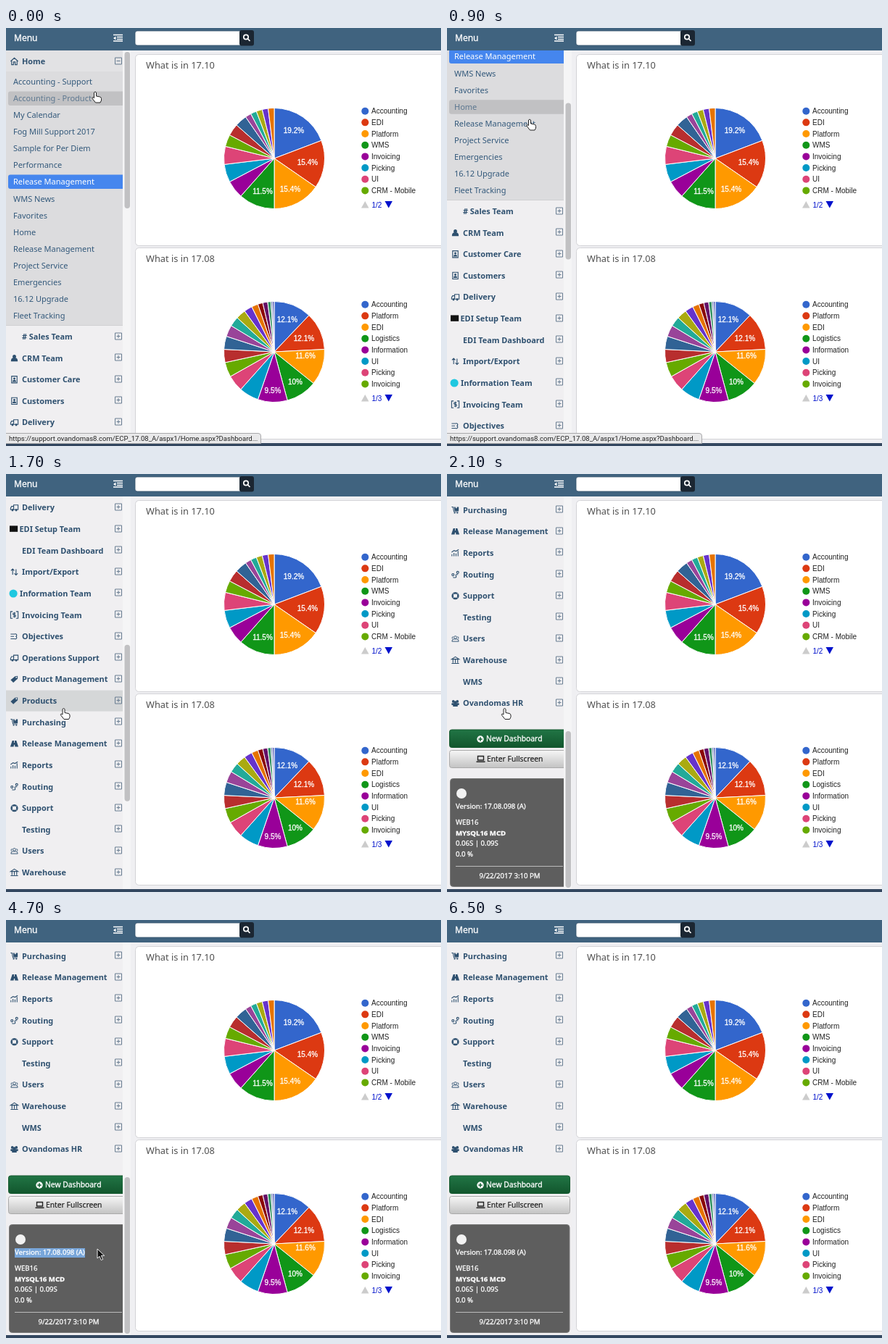
These frames come from a looping animation (600 by 577 pixels, 6.6 s). An HTML page:

```html
<!DOCTYPE html>
<html lang="en">
<head>
<meta charset="utf-8">
<title>Dashboard menu</title>
<style>
  html, body { margin: 0; width: 100%; height: 100%; overflow: hidden; background: #efeff2; }
  svg { display: block; width: 600px; height: 577px; }
  text { font-family: "Noto Sans", "Open Sans", sans-serif; white-space: pre; }
  .chart { font-family: "Liberation Sans", Arial, sans-serif; font-size: 10px; fill: #222; }
  .sub { font-size: 11px; fill: #33597b; }
  .group { font-size: 10.9px; font-weight: 700; fill: #2e506f; }
  .button { font-size: 10.3px; }
  .info { font-size: 9.6px; }
  .light { fill: #fff; stroke: #fff; stroke-width: .3; }
  .status { font: 9.55px Roboto, sans-serif; fill: #222; }
  .line { fill: none; stroke: #2e506f; stroke-width: 1.2; }
  .solid { fill: #2e506f; }
</style>
</head>
<body>
<svg viewBox="0 0 600 577">
  <defs>
    <linearGradient id="green" x2="0" y2="1"><stop stop-color="#217545"/><stop offset="1" stop-color="#12562d"/></linearGradient>
    <linearGradient id="silver" x2="0" y2="1"><stop stop-color="#f6f6f6"/><stop offset="1" stop-color="#c3c3c3"/></linearGradient>
    <clipPath id="side"><rect id="sideBox" y="31" width="161" height="542"/></clipPath>
  </defs>
  <rect width="600" height="577" fill="#efeff2"/>
  <g id="main"></g>
  <rect y="30" width="172" height="543" fill="#f0eff1"/>
  <g clip-path="url(#side)"><g id="menu"></g></g>
  <g id="bar">
    <rect x="161" y="31" width="11" height="542" fill="#f5f5f6"/>
    <rect id="thumb" x="163.5" y="33" width="7.5" height="216" rx="3.7" fill="#c1c1c3"/>
  </g>
  <rect y="573" width="600" height="4" fill="#33475f"/>
  <g id="head"></g>
  <g id="status">
    <path d="M0 559.5H348q3.500 0 3.500 3.500V573.500H0" fill="#e9e9ea" stroke="#a9a9ab"/>
    <text x="4" y="570" class="status">https://support.ovandomas8.com/ECP_17.08_A/aspx1/Home.aspx?Dashboard...</text>
  </g>
  <path id="hand" d="M-1.500 1q1.500-2 3 0v5l5 1q2 .6 2 2.500v2.500l-1.500 3h-6.500l-4.700-6q0-2 2-1l.7.700z" fill="#fff" stroke="#222"/>
  <path id="arrow" d="M0 0v13l3-2.800 2.300 5.300 2.300-1-2.200-5.200h4.300z" fill="#111" stroke="#fff" stroke-width=".9"/>
</svg>
<script>
const $ = id => document.getElementById(id);
const text = (x, y, str, cls, extra = '') => `<text x="${x}" y="${y}" class="${cls}" ${extra}>${str}</text>`;
const rect = (x, y, w, h, fill, extra = '') => `<rect x="${x}" y="${y}" width="${w}" height="${h}" fill="${fill}" ${extra}/>`;
const path = (d, cls, extra = '') => `<path d="${d}" class="${cls}" ${extra}/>`;

// Charts
const colors = ('#36c #dc3912 #ff9900 #109618 #909 #0099c6 #dd4477 #66aa00 #b82e2e #316395 ' +
  '#949 #2a9 #aa1 #63c #e67300 #8b0707 #651067 #329262 #5574a6 #3b3eac').split(' ');

function pie(cx, cy, parts) {
  const total = parts.reduce((a, b) => a + b), r = 69.5;
  let sum = 0;
  const rim = () => {
    const a = sum / total * 2 * Math.PI;
    return `${cx + r * Math.sin(a)} ${cy - r * Math.cos(a)}`;
  };
  return parts.map((part, i) => {
    const from = rim();
    sum += part;
    return `<path d="M${cx} ${cy}L${from}A${r} ${r} 0 0 1 ${rim()}z" fill="${colors[i]}" stroke="#fff"/>`;
  }).join('');
}

function card(top, title, parts, labels, legend, page) {
  const first = top + 77.7, foot = top + 207;
  return rect(178.5, top - .5, 440, 264, '#fff', 'rx="5" stroke="#d3d3d7"') +
    text(193, top + 19, title, '', 'font-size="12.8" fill="#505050"') +
    pie(370, top + 143, parts) +
    labels.map(([s, x, y]) => text(x, y + 3.5, s, 'chart light', 'text-anchor="middle"')).join('') +
    legend.split(',').map((s, i) => {
      const y = first + i * 15.67;
      return `<circle cx="495.3" cy="${y}" r="5" fill="${colors[i]}"/>` + text(504, y + 3.6, s, 'chart');
    }).join('') +
    `<path d="M490 ${foot + 4.5}h10.500l-5.200-9.500z" fill="#ccc"/>` +
    text(504.5, foot + 3.6, page, 'chart', 'style="fill:#01c"') +
    `<path d="M522.500 ${foot - 5}h10.500l-5.200 9.500z" fill="#01c"/>`;
}

$('main').innerHTML =
  card(37, 'What is in 17.10', [10, 8, 8, 6, 3, 3, 3, 2, 2, 2, 1, 1, 1, 1, 1],
    [['19.2%', 397, 141], ['15.4%', 416, 185], ['15.4%', 392, 222], ['11.5%', 354, 225]],
    'Accounting,EDI,Platform,WMS,Invoicing,Picking,UI,CRM - Mobile', '1/2') +
  card(304, 'What is in 17.08', [23, 23, 22, 19, 18, 12, 10, 9, 8, 8, 7, 6, 6, 5, 4, 3, 3, 2, 1, 1],
    [['12.1%', 388, 402], ['12.1%', 411, 428], ['11.6%', 413, 452.5], ['10%', 399, 488], ['9.5%', 368, 500]],
    'Accounting,Platform,EDI,Logistics,Information,UI,Picking,Invoicing', '1/3');

// Header
$('head').innerHTML = rect(0, 0, 600, 31, '#40637f') +
  text(11, 18, 'Menu', 'light', 'font-size="12"') +
  `<path d="M148 9.500h13M153 12.500h8M153 15.500h8M148 18h13" stroke="#fff" stroke-width="1.500"/>
   <path d="M151.500 11.500v5l-3.500-2.500z" fill="#fff"/>` +
  rect(178, 4, 150, 20, '#fff', 'rx="3" stroke="#33516a" stroke-width=".8"') + rect(322, 3, 20, 21.5, '#1b2632', 'rx="3"') +
  `<g fill="none" stroke="#fff" stroke-width="1.700"><circle cx="331" cy="12.500" r="3.200"/><path d="M333.500 15l3 3"/></g>`;

// Menu icons, drawn around their own centre
const icons = {
  home: path('M-5.500 0L0-5 5.500 0M-4-1v6h2.800v-4h2.400v4H4v-6', 'line'),
  user: path('M0-5a2.600 2.800 0 0 1 0 5.600a2.600 2.800 0 0 1 0-5.600M-5 5q0-5 3-5q2 1.500 4 0q3 0 3 5z', 'solid'),
  badge: path('M-4-5h8v10h-8z', 'line') + path('M0-3a1.600 1.600 0 0 1 0 3.200a1.600 1.600 0 0 1 0-3.200M-2.700 3.500q0-3 2.700-3t2.700 3z', 'solid'),
  truck: path('M-1-4h6.500v7h-6.500zM-1-2h-3l-1.500 2.500v2.500h4.500', 'line') + path('M-4 2h2.500v3h-2.500zM1.500 2h2.500v3h-2.500z', 'solid'),
  block: rect(-7, -5, 12, 9, '#111'),
  dot: '<circle cx="-1.500" r="6" fill="#1fc8e0"/>',
  swap: path('M-2.500 4v-8M-5-2l2.500-2.500 2.500 2.500M2.500-4v8M0 2l2.500 2.500 2.500-2.500', 'line'),
  bill: path('M-2.500-5h-3v10h3M2.500-5h3v10h-3M2-2.500q-4-1-4 .8t2 1.500 2 1.700-4 .8M0-4v8', 'line'),
  goal: path('M-5.500-3.500h6M-5.500 0h5M-5.500 3.500h6M.5-3.500a2 2 0 1 1 2 3.500a2 2 0 1 1-2 3.500', 'line'),
  tag: path('M-5.500 1L1-4.500l4-.5 0 4L-1.500 5z', 'solid') + '<circle cx="3" cy="-3" r="1" fill="#fff"/>',
  cart: path('M-5.500-4.500h2l1.500 7h6.500', 'line') + path('M-2-4.500h2.300v2h2v-2h2.700v6h-6zM-2 3.200h2v2h-2zM2 3.200h2v2h-2z', 'solid'),
  road: path('M-3-4.500h2.500v3h1v-3h2.500l3 9h-5l-.5-3h-1l-.5 3h-5z', 'solid'),
  bars: path('M-5 5v-3M-2 5v-5M1 5v-4M4 5v-8M-5.500-1l3.500-2.500 3 1 4-2.500', 'line'),
  route: path('M-3.500 4.500q6 1 4.500-2t3-2M3.500-4.500a1.600 1.600 0 0 1 0 3.200a1.600 1.600 0 0 1 0-3.200M-3.500-1a1.600 1.600 0 0 1 0 3.200a1.600 1.600 0 0 1 0-3.200', 'line'),
  ring: '<circle r="4.200" class="line" style="stroke-width:2.600"/>' + path('M-3.500-3.500l2 2M3.500-3.500l-2 2M-3.500 3.500l2-2M3.500 3.500l-2-2', '', 'stroke="#f0eff1"'),
  users: path('M0-4a2 2 0 0 1 0 4a2 2 0 0 1 0-4M-5 4q0-3.500 3-3.500h4q3 0 3 3.500zM-3-3q-2.500 0-1.500 3M3-3q2.500 0 1.500 3', 'line', 'style="stroke-width:1"'),
  bank: path('M-5.500-1.500L0-5l5.500 3.500zM-3.500-1v5M0-1v5M3.500-1v5M-5.500 4.800h11', 'line'),
  team: path('M-3-4.500a2 2 0 0 1 0 4a2 2 0 0 1 0-4M3-4.500a2 2 0 0 1 0 4a2 2 0 0 1 0-4M0-3.300a2.300 2.300 0 0 1 0 4.600a2.300 2.300 0 0 1 0-4.600' +
    'M-5.500 3v-3h11v3h-2v2h-7v-2z', 'solid')
};
const icon = (name, y) => `<g transform="translate(11.500 ${y}) scale(.93)">${icons[name] || ''}</g>`;
const toggle = (y, open) => path(`M150.500 ${y - 4.5}h9v9h-9zM152.500 ${y}h5${open ? '' : `M155 ${y - 2.5}v5`}`,
  '', 'fill="none" stroke="#687d91"');

// Menu rows
const subs = ['Accounting - Support', 'Accounting - Product', 'My Calendar', 'Fog Mill Support 2017', 'Sample for Per Diem',
  'Performance', 'Release Management', 'WMS News', 'Favorites', 'Home', 'Release Management', 'Project Service',
  'Emergencies', '16.12 Upgrade', 'Fleet Tracking'];
const groups = ['# Sales Team', 'CRM Team:user', 'Customer Care:badge', 'Customers:badge', 'Delivery:truck', 'EDI Setup Team:block',
  'EDI Team Dashboard', 'Import/Export:swap', 'Information Team:dot', 'Invoicing Team:bill', 'Objectives:goal',
  'Operations Support:truck', 'Product Management:tag', 'Products:tag', 'Purchasing:cart', 'Release Management:road',
  'Reports:bars', 'Routing:route', 'Support:ring', 'Testing', 'Users:users', 'Warehouse:bank', 'WMS', 'Ovandomas HR:team'];
const subY = i => 74 + 23.08 * i;
const groupY = i => 426 + 29.62 * i;
const END = 791;

const footer = `<g transform="translate(0 ${END})">` +
  rect(3.5, 353, 166, 24.5, 'url(#green)', 'rx="3" stroke="#14592f"') +
  '<circle cx="46" cy="366" r="4.700" fill="#fff"/><path d="M43.300 366h5.400M46 363.300v5.400" stroke="#176236" stroke-width="1.600"/>' +
  text(54, 369, 'New Dashboard', 'button light') +
  rect(3.5, 381.5, 166, 24, 'url(#silver)', 'rx="3" stroke="#aaa"') +
  '<path d="M42.500 389.500h8v5.500h-8zM40.500 397.300h12" fill="none" stroke="#222" stroke-width="1.400"/>' +
  text(55, 397, 'Enter Fullscreen', 'button', 'fill="#222" stroke="#222" stroke-width=".2"') +
  rect(4.5, 420.500, 164.5, 149, '#5e5e5e', 'rx="4" stroke="#777"') +
  '<circle cx="20" cy="441" r="7" fill="#f2f2f2"/>' +
  '<rect id="pick" x="12" y="453" height="13" fill="#78a6da"/>' +
  text(12, 462, 'Version: 17.08.098 (A)', 'info light') + text(12, 483.500, 'WEB16', 'info light') +
  text(12, 498.5, 'MYSQL16 MCD', 'info light', 'font-weight="700"') +
  text(12, 513, '0.06S | 0.09S', 'info light') + text(12, 527.5, '0.0 %', 'info light') +
  rect(12, 541, 148, 1, '#bbb') + text(86.5, 558, '9/22/2017 3:10 PM', 'info light', 'text-anchor="middle"') + '</g>';

$('menu').innerHTML = rect(0, 31, 172, 380, '#dcdcde') + rect(0, 31, 172, 29, '#e2e2e4') + rect(0, 410, 172, 1, '#d0d0d2') +
  '<rect id="hover"/>' + icon('home', 46) + text(22, 50, 'Home', 'group') + toggle(45.5, true) +
  rect(3, subY(6) - 10, 170, 19.5, '#4586ee', 'rx="3"') +
  subs.map((s, i) => text(10, subY(i) + 4, s, 'sub', i === 6 ? 'style="fill:#fff"' : '')).join('') +
  groups.map((g, i) => {
    const [label, name] = g.split(':'), y = groupY(i);
    const x = name === 'block' ? 18.5 : name === 'dot' ? 19 : 22;
    return icon(name, y) + text(x, y + 4, label, 'group') + toggle(Math.floor(y) - .5);
  }).join('') + footer;

// Motion: keys are [time, value...], eased between neighbours
const scrollKeys = [[0, 0], [300, 0], [900, 172.5], [1600, 498], [1700, 498], [2100, END]];
const cursorKeys = [[0, 123, 88], [300, 123, 88], [900, 114, 126], [1600, 79.5, 323.5], [2400, 79.5, 323.5], [3100, 24, 467],
  [3500, 24, 467], [3800, 12, 459], [4600, 126, 454], [5500, 126, 454], [6200, 200, -20]];

function at(keys, t) {
  const n = keys.findIndex(k => k[0] > t);
  if (n < 0) return keys[keys.length - 1].slice(1);
  if (n === 0) return keys[0].slice(1);
  const a = keys[n - 1], b = keys[n];
  const u = (t - a[0]) / (b[0] - a[0]), e = u * u * (3 - 2 * u);
  return a.slice(1).map((v, i) => v + (b[i + 1] - v) * e);
}

function set(id, attrs) {
  for (const key in attrs) $(id).setAttribute(key, attrs[key]);
}
const show = (id, on) => { $(id).style.display = on ? '' : 'none'; };

function draw(now) {
  const t = Math.floor(now % 6600 / 100) * 100;
  const scroll = Math.round(at(scrollKeys, t)[0]), [x, y] = at(cursorKeys, t);
  const inside = x < 172 && y > 30;
  set('menu', { transform: `translate(0 ${-scroll})` });
  set('thumb', { y: 33 + scroll * 322 / END });
  set('sideBox', { width: inside ? 161 : 172 });
  show('bar', inside);

  // The highlight trails the scroll slightly
  const docY = y + at(scrollKeys, Math.max(0, t - 100))[0];
  const sub = Math.round((docY - subY(0)) / 23.08), group = Math.round((docY - groupY(0)) / 29.62);
  const hovering = t < 2000, onSub = hovering && sub < subs.length;
  show('hover', hovering);
  set('hover', onSub
    ? { x: 3, y: subY(sub) - 9.5, width: 170, height: 19.5, rx: 3, fill: '#c1c1c3' }
    : { x: 0, y: groupY(group) - 14.5, width: 172, height: 29, rx: 0, fill: '#d5d7d8' });
  show('status', onSub);
  document.querySelectorAll('.sub').forEach((el, i) => { el.style.opacity = onSub && i === sub && i !== 6 ? .7 : 1; });

  const picking = t >= 3800 && t < 5600;
  set('pick', { width: picking ? Math.min(97, Math.max(0, x - 12)) : 0 });
  const hand = x < 172 && y < 406;
  for (const id of ['hand', 'arrow']) {
    set(id, { transform: `translate(${x} ${y})` });
    show(id, t < 6200 && (id === 'hand') === hand);
  }
}

const start = performance.now();
function tick() {
  draw(performance.now() - start);
  requestAnimationFrame(tick);
}
tick();
</script>
</body>
</html>
```
